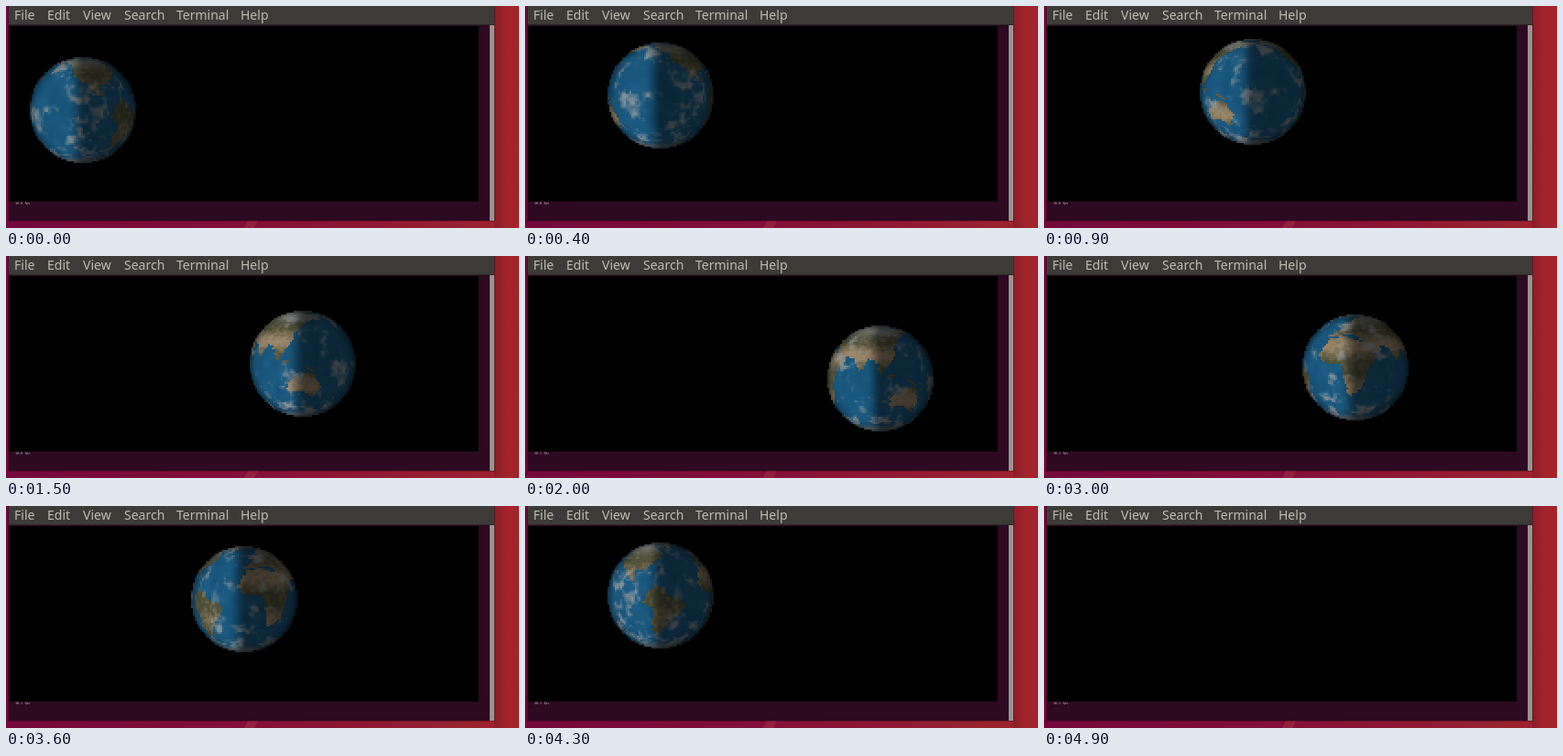
An HTML page with a canvas that plays this animation: 560 by 243 pixels, repeating every 5700 ms.

```html
<!DOCTYPE html>
<html lang="en">
<head>
<meta charset="utf-8">
<title>Terminal globe</title>
<style>
  html, body { margin: 0; width: 100%; height: 100%; overflow: hidden; }
  body {
    position: relative;
    background: linear-gradient(90deg, #74083c, #820e39 45%, #98202f 88%, #a3232b);
  }
  div, span, canvas, svg { position: absolute; }
  #side { left: 533px; top: 0; width: 27px; height: 243px;
    background: linear-gradient(90deg, #8a1e28, #a1232b 45%, #a5242c); }
  #tail { left: 0; top: 235px; }
  #term { left: 3px; top: 0; width: 530px; height: 235px; background: #2d0922;
    box-shadow: 0 0 0 1px rgba(0, 0, 0, .25); }
  #menu { left: 0; top: 0; width: 530px; height: 21px; background: #3c3b37;
    border-bottom: 1px solid #292824; box-sizing: border-box; }
  #menu span { top: 0; color: #bfbbb2; font: 14px/20px "Noto Sans", "Open Sans", sans-serif; }
  #screen { left: 0; top: 22px; width: 513px; height: 192px; background: #000; }
  #bar { left: 525px; top: 21px; width: 5px; height: 214px; background: #99938e; }
  #rate { left: 7px; top: 214px; color: #c8c4c6; white-space: pre;
    font: 3.4px/4px "DejaVu Sans Mono", monospace; }
  #globe { left: 0; top: 0; width: 116px; height: 116px; image-rendering: pixelated; }
</style>
</head>
<body>
<svg id="tail" width="560" height="8"><path d="M260 8L264 0H275L271 8Z" fill="#92203f"/></svg>
<div id="side"></div>
<div id="term">
  <div id="menu">
    <span style="left:6px">File</span><span style="left:42px">Edit</span>
    <span style="left:81px">View</span><span style="left:126px">Search</span>
    <span style="left:183px">Terminal</span><span style="left:253px">Help</span>
  </div>
  <div id="screen"></div>
  <div id="bar"></div>
  <div id="rate"></div>
</div>
<canvas id="globe" width="58" height="58"></canvas>
<script>
const LOOP = 5700, GONE = 49, SIZE = 58, RAD = Math.PI / 180;
const globe = document.getElementById('globe');
const rate = document.getElementById('rate');
const ctx = globe.getContext('2d');

// Coastlines as longitude, latitude pairs
const coasts = {
  northAmerica: [-165,65, -125,70, -82,70, -56,52, -80,32, -82,27, -97,27, -95,17, -83,9, -105,20, -124,40, -135,58],
  southAmerica: [-72,12, -50,0, -35,-7, -40,-22, -57,-37, -69,-54, -74,-40, -71,-18, -81,-5],
  africa: [-17,14, -8,34, 10,37, 33,30, 51,12, 40,-5, 35,-22, 20,-35, 10,3, -8,5],
  eurasia: [-9,37, 8,55, 25,70, 100,77, 178,67, 140,55, 121,38, 121,28, 103,2, 98,17, 90,22, 78,8, 72,21, 57,25, 58,20, 45,13, 35,31, 28,38],
  australia: [114,-23, 131,-12, 143,-11, 153,-27, 147,-38, 133,-32, 116,-35],
  greenland: [-55,81, -22,80, -43,60],
  newGuinea: [132,-1, 150,-9, 139,-8],
  borneo: [109,1, 117,6, 115,-4]
};

function drawLand() {
  const map = document.createElement('canvas');
  map.width = 360;
  map.height = 180;
  const pen = map.getContext('2d');
  for (const coast of Object.values(coasts)) {
    pen.beginPath();
    for (let i = 0; i < coast.length; i += 2) pen.lineTo(coast[i] + 180, 90 - coast[i + 1]);
    pen.fill();
  }
  return pen.getImageData(0, 0, 360, 180).data;
}
const land = drawLand();

const clamp = v => Math.min(1, Math.max(0, v));
const smooth = (a, b, v) => { const u = clamp((v - a) / (b - a)); return u * u * (3 - 2 * u); };
const lerp = (a, b, u) => a + (b - a) * u;
const mix = (a, b, u) => a.map((v, i) => lerp(v, b[i], u));

function hash(x, y, z) {
  const s = Math.sin(x * 127.1 + y * 311.7 + z * 74.7) * 43758.5453;
  return s - Math.floor(s);
}

function noise(x, y, z) {
  const [i, j, k] = [x, y, z].map(Math.floor);
  const u = smooth(0, 1, x - i), v = smooth(0, 1, y - j), w = smooth(0, 1, z - k);
  const row = (b, c) => lerp(hash(i, b, c), hash(i + 1, b, c), u);
  const layer = c => lerp(row(j, c), row(j + 1, c), v);
  return lerp(layer(k), layer(k + 1), w);
}

function surface(lat, lon) {
  const c = Math.cos(lat * RAD);
  const p = [c * Math.cos(lon * RAD), Math.sin(lat * RAD), c * Math.sin(lon * RAD)];
  const at = f => noise(p[0] * f + 9, p[1] * f + 5, p[2] * f + 7);
  const fine = at(17), broad = at(6);

  const col = Math.floor(lon + (fine - .5) * 6 + 900) % 360;
  const row = Math.floor(Math.min(179, Math.max(0, 90 - lat + (broad - .5) * 6)));
  let color = mix([21, 82, 120], [30, 94, 134], broad);
  if (land[(row * 360 + col) * 4 + 3] > 127) {
    const oldWorld = lon > -20 && lon < 160;
    const dry = Math.exp(-(((Math.abs(lat) - 25) / 13) ** 2)) * (oldWorld ? 1 : .4);
    color = mix([78, 79, 56], [154, 133, 104], clamp(dry + (fine - .5) * .7));
    color = mix(color, [138, 138, 128], smooth(42, 70, lat));
  }
  const ice = Math.max(smooth(-58, -74, lat), smooth(66, 82, lat));
  const haze = smooth(32, 60, Math.abs(lat)) * .16;
  const cloud = smooth(.55, .88, .65 * at(5) + .35 * at(14) + haze);
  return mix(color, [150, 156, 158], Math.max(ice * .75, cloud * .85));
}

function drawGlobe(step) {
  const image = ctx.createImageData(SIZE, SIZE);
  const middle = -115 - 7.5 * step;
  for (let j = 0; j < SIZE; j++) for (let i = 0; i < SIZE; i++) {
    const x = (i - 28.5) / 29, y = (j - 28.5) / 29, zz = 1 - x * x - y * y;
    if (zz < 0) continue;
    const z = Math.sqrt(zz);
    const lon = ((middle + Math.atan2(x, z) / RAD + 900) % 360) - 180;
    const color = surface(-Math.asin(y) / RAD, lon);
    const night = .56 * smooth(-.3, .05, x);
    const light = (1 - night) * (.4 + .6 * smooth(-.1, .65, z));
    image.data.set([...color.map(v => v * light), 255], (j * SIZE + i) * 4);
  }
  ctx.putImageData(image, 0, 0);
}

// Uneven capture: some ticks hold the picture, others skip a step
const held = [12, 18, 25, 27, 32, 37, 44, 47], skipped = [11, 26, 28, 38, 48];
const steps = [0];
for (let tick = 1; tick < GONE; tick++)
  steps[tick] = steps[tick - 1] + (held.includes(tick) ? 0 : skipped.includes(tick) ? 2 : 1);

const start = performance.now();
let shown = -1;

function frame() {
  const tick = Math.floor(((performance.now() - start) % LOOP) / 100);
  if (tick !== shown) {
    shown = tick;
    rate.textContent = tick < 20 ? '10.0 fps' : tick < 45 ? '10.1 fps' : '10.2 fps';
    globe.style.visibility = tick < GONE ? 'visible' : 'hidden';
    if (tick < GONE) {
      const step = steps[tick];
      const x = 84 + 16 * Math.min(step, 45 - step);
      const y = 86 + Math.abs(x - 196) / 4;
      globe.style.transform = `translate(${x - 58}px, ${y - 58}px)`;
      drawGlobe(step);
    }
  }
  requestAnimationFrame(frame);
}
frame();
</script>
</body>
</html>
```
